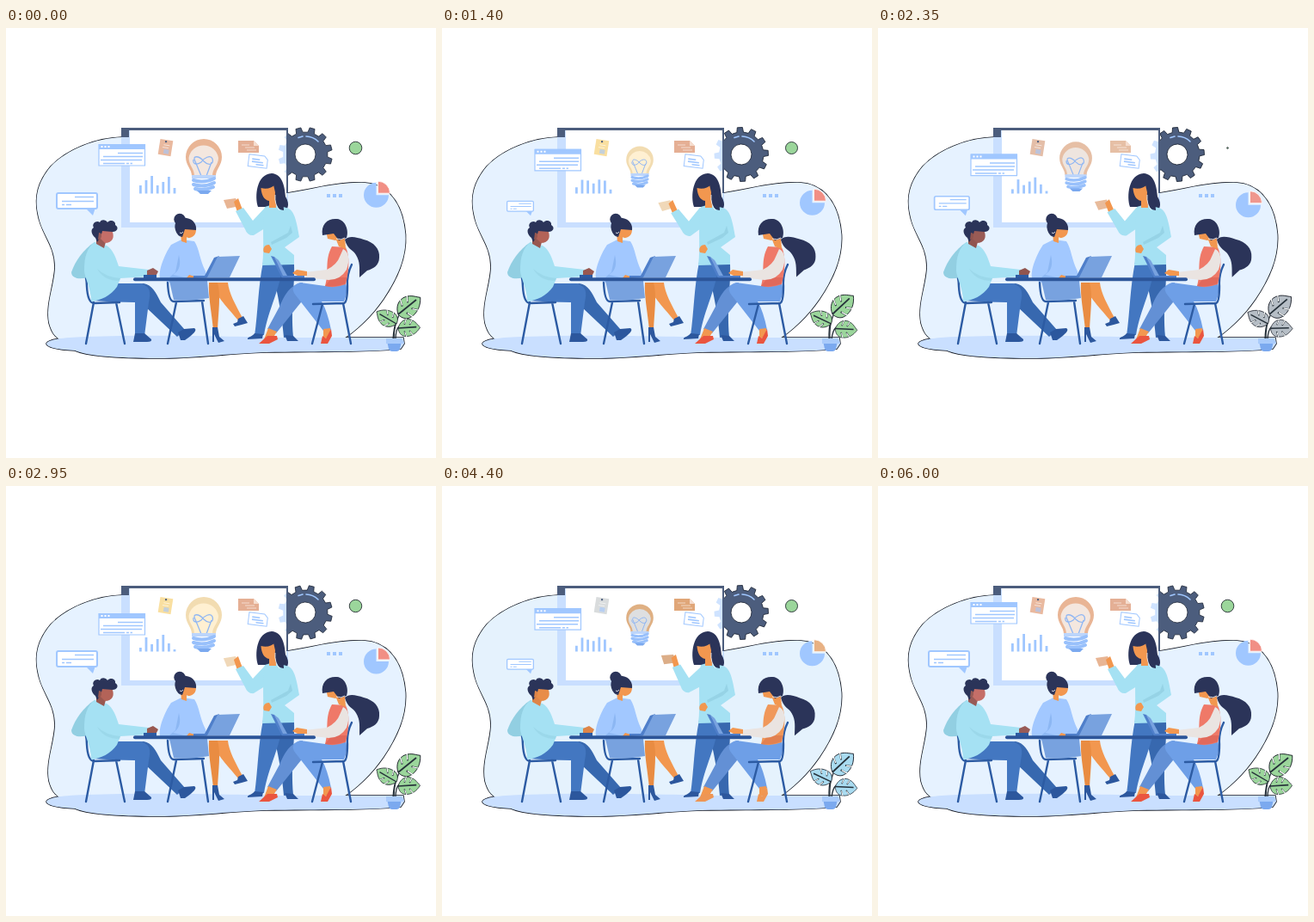
An HTML page for the animation above (6100 ms loop, 500 by 500 pixels).

```html
<!DOCTYPE html>
<html lang="en">
<head>
<meta charset="utf-8">
<title>Team meeting</title>
<style>
html, body { margin: 0; width: 100%; height: 100%; overflow: hidden; background: #fff; }
svg { display: block; width: 100vw; height: 100vh; }
.edge { stroke: #10151f; stroke-width: .8; }
.hair { fill: #2b3459; }
.shirt { fill: #a5e1f3; }
.shade { fill: #92cfe2; }
.blouse { fill: #a2c8ff; }
.pants { fill: #4377c1; }
.dark { fill: #3768af; }
.skin { fill: #f2974f; }
.navy { fill: #2c579d; }
.sky { fill: #a0c7ff; }
.line { fill: none; stroke: #a0c7ff; stroke-width: 1.6; }
.chair { fill: none; stroke: #2c5ba3; stroke-width: 2.4; stroke-linecap: round; stroke-linejoin: round; }
.note { fill: var(--note); }
.clip { fill: var(--clip); }
.tan { fill: var(--tan); }
.cheek { fill: var(--cheek); }
.vest { fill: var(--vest); }
.shoe { fill: var(--shoe); }
.leaf { fill: var(--leaf); }
</style>
</head>
<body>
<svg id="stage" viewBox="0 0 500 500">
  <defs>
    <clipPath id="boardArea"><rect x="144" y="119" width="182" height="107"/></clipPath>
    <path id="blob" d="M135 127C104 128 71 141 52 161C37 179 33 196 37 216C41 240 57 252 57 278C56 300 46 321 50 343C53 354 57 360 66 364H388C407 353 426 334 439 315C455 291 466 267 464.500 240C462 209 449 187 425 181C396 176 355 188 327 192V127Z"/>
    <path id="floor" d="M47 367C49 362 65 360 92 359C180 356 270 359 330 360H462L463 367L459 373C431 377 360 376 302 377C251 379 222 384 176 384C128 384 93 381 80 375C62 374 48 372 47 367Z"/>
    <g id="leafShape">
      <path class="leaf edge" d="M0 0C-8-3-13-10-10-18C-7-25-1-27 2-30C9-25 14-17 12-8C11-3 6 0 0 0Z"/>
      <path d="M0 0L1-25M-11-12L-4-9M-9-20L-3-16M13-10L5-8M11-19L5-15" fill="none" stroke="#26313a" stroke-width="1.800"/>
      <path d="M-12-12.500L-5-9.500M-10-20.500L-4-16.500M14-10.500L6-8.500M12-19.500L6-15.500" fill="none" stroke="#fff" stroke-width="1.200"/>
    </g>
  </defs>

  <!-- Backdrop and floor share one outline -->
  <g class="edge" stroke-linejoin="round" style="stroke-width:1.6"><use href="#blob"/><use href="#floor"/></g>
  <use href="#blob" style="fill:var(--air)"/>
  <use href="#floor" fill="#c9dfff"/>

  <path class="gear" fill="#4c5d7d" fill-rule="evenodd" stroke="#1c2535" stroke-width=".8"/>
  <path d="M349 126A21 21 0 0 1 363 132M340 127.500L345 126" fill="none" stroke="#a0c7ff" stroke-width="1.6" stroke-linecap="round"/>

  <!-- Board -->
  <path fill="#c9dfff" d="M134 116H328V232H134Z"/>
  <path fill="#4c5d7d" d="M134 116H328V192H325V119H143V127H134Z"/>
  <path fill="#fff" d="M144 119H326V226H144Z"/>
  <path class="gear" fill="#cfe3ff" fill-rule="evenodd" clip-path="url(#boardArea)"/>

  <g transform="rotate(9 185 139)">
    <path class="note" d="M178 130H193V148H178Z"/>
    <circle cx="185" cy="132" r="1.200" fill="#4c5d7d"/>
    <path d="M183 136H190M182 139H189" stroke="#fff" stroke-width=".8" opacity=".7"/>
    <path d="M184 141H190V146H184Z" class="sky" opacity=".6"/>
  </g>
  <path class="clip" d="M270 131H288L294 137V145H270Z"/>
  <path d="M288 131V137H294Z" fill="#f5ddcf"/>
  <path d="M274 136H283M278 139H289M280 142H291" stroke="#fff" stroke-width="1" opacity=".55"/>
  <g transform="rotate(7 293 155)">
    <path d="M282 148H300L304 152V162H282Z" fill="#fff" stroke="#a0c7ff"/>
    <path class="line" d="M286 153H295M286 156H299M291 159H300" stroke-width="1.200"/>
  </g>
  <g id="bars" class="sky"></g>

  <g id="bulb">
    <path d="M216 172C216 164 209 160 209 150A21 21 0 0 1 251 150C251 160 244 164 244 172Z" style="fill:var(--rim)"/>
    <path d="M219 172C219 163 212.500 160 212.500 151A17.500 17.500 0 0 1 247 151C247 160 240 163 240 172Z" style="fill:var(--glass)"/>
    <path d="M227 172L220 155C216 148 224 148 230 155C236 161 242 158 240 152C238 147 230 151 227 156C221 160 217 158 218 153M233 172L239 156" fill="none" stroke="#8fb6f3" stroke-width="1.300"/>
    <path d="M216 173H244" stroke="#bcd5fb" stroke-width="4"/>
    <path d="M218 177Q230 181 242 175M218 182Q230 186 242 180M220 187Q230 190 241 185" fill="none" stroke="#98c0fb" stroke-width="4" stroke-linecap="round"/>
    <path d="M222 189H239L235 193H226Z" fill="#7ba9ef"/>
  </g>

  <!-- Floating widgets -->
  <g id="panel">
    <path d="M108 135.500H161.500V160H108Z" fill="#fff" stroke="#a0c7ff" stroke-width="1.200"/>
    <path class="sky" d="M108 135H162V141H108Z"/>
    <path d="M110.500 138H112.500M114.500 138H116.500M118.500 138H120.500" stroke="#fff" stroke-width="2"/>
    <path class="line" d="M130 145.500H159M113 149.500H159M110 153.500H158M113 157.500H138M140 157.500H143M144.500 157.500H147"/>
  </g>
  <g id="bubble">
    <path class="sky" d="M92 209H104L101 218Z"/>
    <rect x="59" y="192" width="47" height="18" rx="2" fill="#fff" stroke="#a0c7ff" stroke-width="2"/>
    <path class="line" d="M80 196.500H102M65 201.500H102M65 205.500H68M70 205.500H76"/>
  </g>
  <path class="sky" d="M373 193H377V197H373ZM380 193H384V197H380ZM387 193H391V197H387Z"/>
  <g id="pie">
    <path class="sky" d="M430.500 193V178.500A14.500 14.500 0 1 0 445 193Z"/>
    <path d="M432.500 191V177A14 14 0 0 1 446.500 191Z" style="fill:var(--pie)" stroke="#fff" stroke-width=".8"/>
  </g>
  <circle id="dot" class="edge" cx="406.500" cy="139.500" fill="#9bd69b"/>

  <!-- Plant -->
  <g id="leafTop"><path d="M451 362Q451 346 457 334" fill="none" stroke="#26313a" stroke-width="1.300"/><use href="#leafShape" transform="translate(456 333) rotate(49) scale(1 1.080)"/></g>
  <g id="leafLeft"><path d="M450 362Q451 348 453 344" fill="none" stroke="#26313a" stroke-width="1.300"/><use href="#leafShape" transform="translate(454 344) rotate(-62) scale(.8 .9)"/></g>
  <g id="leafRight"><path d="M453 362Q453 351 457 347" fill="none" stroke="#26313a" stroke-width="1.300"/><use href="#leafShape" transform="translate(456 349) rotate(84) scale(.85)"/></g>
  <path fill="#7ba9ef" d="M443 364H460L458 373Q457 376 454 376H449Q446 376 445 373Z"/>
  <path fill="#a9cbfb" d="M442 361H460L463 366L460 367H442Z"/>

  <!-- Standing woman -->
  <path class="dark" d="M310 275H335C336 300 331 324 334 359L323 360C321 335 316 308 310 286Z"/>
  <path class="pants" d="M299 272H322C320 302 305 326 300 357L289 358C293 330 293 302 299 272Z"/>
  <path class="navy" d="M289 355L299 356L298 361L281 362C280 359 287 359 289 355ZM324 357L334 358L340 364H327Z"/>
  <path class="hair" d="M293 208C289 196 291 170 309 169C321 170 324 183 325 196C331 206 328 213 318 214L302 208Z"/>
  <g id="arm">
    <path d="M253 200L267 198L272 207L257 210Z" style="fill:var(--card)"/>
    <path class="skin" d="M265 202L270 198L273 206L275 211L269 214Z"/>
    <path class="shirt" d="M267 213L276 209L287 224L301 209L308 214L304 231L288 241Q281 242 278 234Z"/>
  </g>
  <path class="shirt" d="M301 208L311 205L326 209C334 211 337 219 341 243L324 255L335 264V275L298 276C301 254 297 230 301 208Z"/>
  <path class="shade" d="M331 230L328 238L308 249L309 252L326 244L333 238Z" opacity=".8"/>
  <path class="skin" d="M306 252C300 252 298 257 300 261L306 262L309 257Z"/>
  <path class="skin" d="M296.500 186C303 188 309 186 313 182L314 209L306 209V201C300 200 297 194 296.500 186Z"/>
  <path class="hair" d="M310 178C319 184 323 201 323 212C315 212 312 203 313 191Z"/>
  <path d="M313 194Q312 205 318 212" fill="none" stroke="#fff" stroke-width=".8"/>

  <!-- Seated man -->
  <path class="dark" d="M129 300L160 297C170 299 174 307 180 319L208 351L199 359L163 325Z"/>
  <path class="navy" d="M200 354L207 350L219 349C223 351 218 356 208 363L203 363Z"/>
  <path class="pants" d="M101 317L122 297H156C167 300 169 306 166 319L161 358L150 357L150 319Q125 319 101 317Z"/>
  <path class="navy" d="M150 355H161L169 362Q170 365 164 365H148Z"/>
  <path class="chair" d="M89 280Q94 289 94 301Q95 319 102 320L132 319M102 319L93 367M128 319L138 367"/>
  <path class="shade" d="M103 249C90 257 80 272 76 284C76 291 86 293 94 290L114 270Z"/>
  <path class="shirt" d="M103 249L117 253C125 258 128 268 131 277L166 281V289L133 291L129 301C122 311 110 317 99 318C99 302 91 290 91 282C91 266 94 256 103 249Z"/>
  <path class="shade" d="M106 280Q116 290 133 291L132 294Q114 294 106 280Z" opacity=".5"/>
  <path class="tan" d="M164 282L171 279L177 283L175 287L164 288Z"/>
  <path class="tan" d="M105 235H122L123 246L116 249L114 256L105 251Z"/>
  <path class="cheek" d="M112 235H123C127 243 124 250 115 250L110 245Z"/>
  <path class="hair" d="M104 244C99 240 98 234 102 232C99 227 106 223 109 226C111 222 116 223 118 226C122 222 128 225 127 229C132 232 129 237 124 237L112 236L110 243L106 249Z"/>
  <path class="tan" d="M108 238Q113 238 110 245L107 246Z"/>

  <!-- Seated woman in blue -->
  <path class="skin" d="M236 296H258C259 308 267 322 275 337L270 340C259 327 249 316 243 306Z"/>
  <path d="M236 296H246C250 310 247 330 246 351H241C239 330 235 312 236 296Z" fill="#e98c42"/>
  <path class="navy" d="M270 338L276 335L281 343L274 345L266 347L264 344L269 342ZM240 348H246L248 359L254 364L247 366L242 356L242 365H240Z"/>
  <path class="chair" d="M188 296Q189 318 195 318L230 317M198 319L188 367M228 318L235 367"/>
  <path class="blouse" d="M204 246L219 248C225 257 225 269 232 283L234 296H190L179 291C177 279 187 259 192 252Z"/>
  <path fill="#78a2df" d="M190 294H234L236 314Q215 318 195 316Z"/>
  <path fill="#83afee" d="M201 264C204 276 201 283 194 287L212 291L190 290L197 284Z" opacity=".7"/>
  <path class="skin" d="M203 239L210 239L210 250L204 248ZM213 287L223 290L217 294L208 293Z"/>
  <path class="skin" d="M203 229L219 228C223 234 221 244 212 244L204 241Z"/>
  <circle class="hair" cx="202" cy="222.500" r="6.700"/>
  <path class="hair" d="M197 235C194 225 202 220 210 221C218 222 222 229 221 235L208 234L205 243Q199 242 197 235Z"/>
  <path d="M202 238Q204 240 206 237" fill="none" stroke="#fff" stroke-width=".8"/>

  <!-- Seated woman in red -->
  <path d="M345 296C329 299 324 311 318 324L304 350L314 355L343 319Z" fill="#6390d5"/>
  <path d="M394 294L371 300L342 296C332 299 332 305 337 311L369 352L378 351Q374 330 367 318L393 318Q399 306 394 294Z" fill="#6e9fe7"/>
  <path class="skin" d="M305 349L315 353L310 361L300 362ZM369 350L377 349L377 358L369 362Z"/>
  <path class="shoe" d="M304 358L315 358L316 362L306 367L294 367ZM368 358L372 361L378 350L379 358L374 367H366Z"/>
  <path class="chair" d="M402 275Q396 287 397 300Q397 319 393 320L357 321M368 321L356 367M392 320L401 367"/>
  <path class="vest" d="M379 254L395 255C400 265 399 282 395 298Q382 303 371 300C376 284 370 270 379 254Z"/>
  <path d="M379 290L396 290L395 297Q382 302 371 300Z" fill="#b83c32" opacity=".25"/>
  <path d="M392 257C399 260 400 270 396 281Q389 293 375 293L348 290L347 284L373 281Q385 275 388 266Z" fill="#eae4e1"/>
  <path class="skin" d="M350 283L338 281L333 285L339 288H350ZM383 244L394 243L395 257L387 254Z"/>
  <path class="skin" d="M371 231L389 231Q393 242 383 247L374 245Z"/>
  <path class="hair" id="tail" d="M394 246C399 241 407 243 416 246C428 249 435 257 434 267C434 276 427 280 420 282L411 290C411 279 412 272 407 264C404 258 397 258 394 246Z"/>
  <path class="hair" d="M368 241C366 228 374 221 385 222C395 223 399 236 396 244L387 247L381 239Z"/>
  <path d="M384 245Q390 247 394 244" fill="none" stroke="#fff" stroke-width=".8"/>

  <!-- Table and laptops -->
  <path fill="#2c5ba3" d="M160 287H175V291H160Z"/>
  <path fill="#4f7fca" d="M242 267L248 265L235 290L218 291V288H231Z"/>
  <path fill="#78a2df" d="M246 266L272 265L260 290H234Z"/>
  <path fill="#4f7fca" d="M308 265L312 266L324 288H347V291H321Z"/>
  <path fill="#78a2df" d="M312 266L317 270L327 288H322Z"/>
  <path d="M150 292.300H358" stroke="#2c5599" stroke-width="4" stroke-linecap="round"/>
</svg>
<script>
const CYCLE = 6000, LOOP = 6100, STEP = 50;
const $ = id => document.getElementById(id);
const stage = $("stage");

const names = ["air", "glass", "rim", "note", "card", "clip", "pie", "tan", "cheek", "vest", "shoe", "leaf"];
const peach = ["#e6f2ff", "#f4e7df", "#e9b595", "#e9b99f", "#e8b594", "#e4af95", "#f18f85", "#985b57", "#c56e68", "#ef7968", "#ea553f", "#9bd69b"];
const cream = ["#e6f2ff", "#fff0d2", "#f2dcb1", "#f9dfa0", "#f0d8b8", "#e5af94", "#f18f85", "#985850", "#b36358", "#ef7968", "#ea553f", "#9bd69b"];
const ash = ["#e6f2ff", "#eee5df", "#e6bfa5", "#e4bea8", "#e8bb9b", "#e6bfa5", "#ef978e", "#91554f", "#995b55", "#ef7968", "#ea553f", "#b6bec6"];
const amber = ["#e5f2fd", "#dedfe0", "#dfb083", "#d9dcdd", "#dcae88", "#e0a678", "#e8b184", "#de8548", "#e88d49", "#f0985a", "#ee9655", "#a9dbf0"];
const themes = [[0, peach], [700, cream], [1900, ash], [2650, cream], [3400, amber], [5600, peach]];
let theme;

// Seven bar tops at the two ends of the swing
const barsA = [183, 177, 172, 183, 179, 173, 186];
const barsB = [188, 176, 184, 178, 173, 183, 190];
const BASE = 192.5;
const bars = barsA.map((_, i) => {
  const bar = document.createElementNS("http://www.w3.org/2000/svg", "rect");
  bar.setAttribute("x", 155 + i * 6.6);
  bar.setAttribute("width", 2.8);
  return $("bars").appendChild(bar);
});

function gearPath(cx, cy, teeth) {
  const points = [];
  for (let i = 0; i < teeth; i++) {
    for (const [offset, r] of [[-8.5, 26], [-5.5, 31.5], [5.5, 31.5], [8.5, 26]]) {
      const a = (15 + i * 360 / teeth + offset) * Math.PI / 180;
      points.push((cx + r * Math.sin(a)).toFixed(2) + " " + (cy - r * Math.cos(a)).toFixed(2));
    }
  }
  return `M${points.join("L")}ZM${cx - 12} ${cy}a12 12 0 1 0 24 0a12 12 0 1 0-24 0Z`;
}
const gears = [...document.querySelectorAll(".gear")];
// The clip stays still while the light copy of the gear turns inside it
gears.forEach(g => {
  g.setAttribute("d", gearPath(348, 147, 12));
  if (!g.hasAttribute("clip-path")) return;
  const holder = document.createElementNS("http://www.w3.org/2000/svg", "g");
  holder.setAttribute("clip-path", g.getAttribute("clip-path"));
  g.removeAttribute("clip-path");
  g.replaceWith(holder);
  holder.append(g);
});

const wave = (t, period, peak = 0) => .5 + .5 * Math.cos(2 * Math.PI * (t - peak) / period);
const move = (el, value) => el.setAttribute("transform", value);
const zoom = (el, x, y, s) => move(el, `translate(${x} ${y}) scale(${s}) translate(${-x} ${-y})`);
const turn = (el, deg, x, y) => move(el, `rotate(${deg} ${x} ${y})`);

function draw(t) {
  const slow = wave(t, CYCLE);
  const pulse = wave(t, CYCLE / 2);
  const sway = Math.sin(2 * Math.PI * t / CYCLE);

  zoom($("bulb"), 230, 163, .75 + .25 * pulse);
  zoom($("bubble"), 107, 219, .65 + .35 * pulse);
  move($("panel"), `translate(0 ${13 * (1 - slow)})`);
  move($("pie"), `translate(0 ${13.5 * wave(t, CYCLE, 2250) - .8})`);
  $("dot").setAttribute("r", 7.3 * (.08 + .92 * wave(t, CYCLE / 4)));
  gears.forEach(g => turn(g, t * 180 / CYCLE, 348, 147));

  bars.forEach((bar, i) => {
    const top = barsB[i] + (barsA[i] - barsB[i]) * slow;
    bar.setAttribute("y", top);
    bar.setAttribute("height", BASE - top);
  });

  turn($("arm"), -4 * sway, 298, 225);
  turn($("tail"), -1.5 * sway, 397, 250);
  turn($("leafTop"), -4 * (1 - pulse), 451, 362);
  turn($("leafLeft"), -5 * (1 - pulse), 451, 362);
  turn($("leafRight"), 6 * (1 - pulse), 451, 362);

  const next = themes.filter(([start]) => start <= t).pop()[1];
  if (next !== theme) {
    theme = next;
    names.forEach((name, i) => stage.style.setProperty("--" + name, theme[i]));
  }
}

const begin = performance.now();
function tick() {
  const elapsed = Math.max(0, performance.now() - begin) % LOOP;
  draw(Math.min(CYCLE, Math.floor(elapsed / STEP) * STEP));
  requestAnimationFrame(tick);
}
tick();
</script>
</body>
</html>
```
